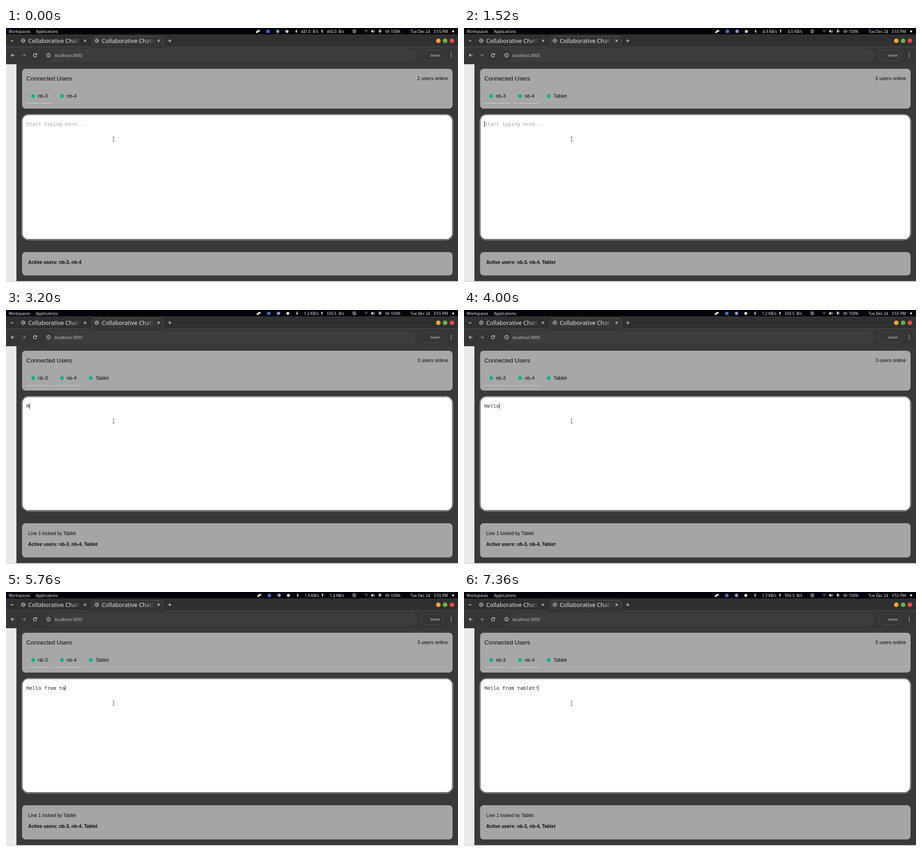
An HTML page for the animation above (8000 ms loop, 998 by 561 pixels).

```html
<!DOCTYPE html>
<html lang="en">
<head>
<meta charset="utf-8">
<title>Collaborative editor</title>
<style>
  html, body { margin: 0; width: 100%; height: 100%; overflow: hidden; background: #393939; }
  svg { display: block; width: 998px; height: 561px; }
  text { white-space: pre; }
  .bar { font: 8.45px "Noto Sans", sans-serif; fill: #f0f0f0; }
  .tab { font: 12.75px "Noto Sans", sans-serif; }
  .url { font: 9px "Noto Sans", sans-serif; fill: #c4c4c4; }
  .guest { font: 500 7.5px "Noto Sans", sans-serif; fill: #e8e8e8; }
  .page { font: 10.92px "Liberation Sans", Arial, sans-serif; fill: #080808; }
  .page .head { font-size: 13.1px; }
  .page .note { font-size: 10.37px; }
  .mono { font: 10.92px "DejaVu Sans Mono", monospace; fill: #222; }
  .end { text-anchor: end; }
  .line { fill: none; stroke: #dcdcdc; stroke-width: 1.2; }
</style>
</head>
<body>
<svg viewBox="0 0 998 561">
  <defs>
    <linearGradient id="fade" gradientUnits="userSpaceOnUse" x1="49" x2="162" y1="0" y2="0">
      <stop offset=".84" stop-color="#e6e6e6"/>
      <stop offset="1" stop-color="#e6e6e6" stop-opacity=".1"/>
    </linearGradient>
    <clipPath id="titleClip"><rect x="49" y="16" width="113" height="25"/></clipPath>
    <g id="tabLabel">
      <g fill="none" stroke="#a9adb1">
        <circle cx="38" cy="28" r="4.3" fill="#85898d"/>
        <path d="M35 26l3 1 1-2M36 31l1-2 3 1" stroke="#303030" stroke-width=".9"/>
      </g>
      <text class="tab" x="49" y="32.6" fill="url(#fade)" clip-path="url(#titleClip)">Collaborative ChatB</text>
      <path class="line" d="M172.2 25.7l4.6 4.6m0-4.6l-4.6 4.6"/>
    </g>
    <g id="chip">
      <circle cx="60" cy="150.2" r="4.2" fill="#0cb486"/>
      <path d="M45.5 166.5H101.5" stroke="#d2d2d2"/>
    </g>
    <path id="arrow" d="M-.8 -3.5H.8V.4H2.5L0 3.5L-2.5 .4H-.8Z" fill="#eee"/>
  </defs>

  <!-- desktop bar -->
  <rect width="998" height="14" fill="#04010b"/>
  <g class="bar">
    <text x="6" y="10.7">Workspaces</text>
    <text x="66" y="10.7">Applications</text>
    <text x="849.5" y="10.7">100%</text>
    <text x="893" y="10.7">Tue Dec 24</text>
    <text x="944" y="10.7">3:55 PM</text>
    <text id="down" class="end" y="10.7"></text>
    <text id="up" class="end" x="746.8" y="10.7"></text>
  </g>
  <g id="tray">
    <path d="M555 4.5h5.5v4H555zM552 7h4v4h-4z" fill="#e6e6e6"/>
    <rect x="575" y="4" width="7" height="7" fill="#3f6fd0"/>
    <circle cx="600" cy="7.3" r="3.6" fill="#7f9dcf"/>
    <circle cx="620.5" cy="7.5" r="3.3" fill="#ddd"/>
    <use href="#arrow" x="641" y="7"/>
  </g>
  <g id="upArrow"><use href="#arrow" transform="translate(0 7) scale(1 -1)"/></g>
  <g fill="none" stroke="#d8d8d8" stroke-width=".9">
    <circle cx="769" cy="7.3" r="3.8"/>
    <path d="M766.8 6.2h4.4M769 4.6v3l-1.3 2.4M769 7.6l1.3 2.4"/>
    <path d="M791.3 6q4-3.4 8 0M792.7 7.7q2.6-2.2 5.2 0M794 9.3q1.3-1 2.6 0" stroke="#999"/>
    <path d="M806.5 6h1.5l2-2v6.5l-2-2h-1.5z" fill="#ddd"/>
    <path d="M811.5 5.5q1.4 1.8 0 3.6M813 4.3q2.2 3 0 6"/>
    <rect x="824" y="3.7" width="2.6" height="4.6" rx="1.3" fill="#ddd"/>
    <path d="M822.7 7q0 2.5 2.6 2.5t2.6-2.5M825.3 9.5v1.7M829 5.5q1.2 1.6 0 3.4"/>
    <rect x="838.5" y="5" width="6.5" height="5" rx="1"/>
    <path d="M840 7.5h3.5M846 6.5v2"/>
  </g>
  <circle cx="987.3" cy="7.4" r="2.2" fill="#f2f2f2"/>

  <!-- browser -->
  <rect y="14" width="998" height="28" fill="#303030"/>
  <rect y="42" width="998" height="38" fill="#363636"/>
  <path d="M0 41.5H184q6 0 6-6V25q0-6.5 6.5-6.5H341q6.500 0 6.500 6.500V35.500q0 6 6 6H998" fill="#363636" stroke="#555"/>
  <use href="#tabLabel"/>
  <use href="#tabLabel" x="162.4"/>
  <path class="line" d="M11 27l2.500 2.500 2.500-2.500M357.800 28.200h7.400M361.500 24.500v7.400"/>
  <circle cx="954.500" cy="28.300" r="5" fill="#f6a62b"/>
  <circle cx="969.500" cy="28.300" r="5" fill="#64b545"/>
  <circle cx="984.500" cy="28.300" r="5" fill="#ee4747"/>
  <rect x="82" y="46" width="825" height="29" rx="14.500" fill="#3d3d3d"/>
  <circle cx="94" cy="60.300" r="11.500" fill="#353535"/>
  <g class="line">
    <path d="M19 60.300h-7.500m3.600-3.600l-3.600 3.600 3.600 3.600"/>
    <path d="M35.500 60.300H43m-3.600-3.600l3.600 3.600-3.600 3.600" stroke="#858585"/>
    <path d="M67 58.200A3.600 3.600 0 1 0 67.600 61M67.700 56v2.800h-2.800"/>
    <circle cx="94" cy="60.300" r="4.100"/>
    <path d="M94 59.800v2.700M94 57.900v1"/>
    <rect x="915.500" y="48.500" width="50" height="24" rx="12" stroke="#515151" stroke-width="1"/>
  </g>
  <path d="M983 56.600h.01M983 60.300h.01M983 64h.01" stroke="#e2e2e2" stroke-width="2" stroke-linecap="round"/>
  <text class="url" x="107" y="63.500">localhost:3000</text>
  <text class="guest" x="937" y="63">Guest</text>

  <!-- page -->
  <rect y="80" width="998" height="481" fill="#393939"/>
  <rect y="80" width="23" height="481" fill="#e9e9ea"/>
  <rect y="559" width="998" height="2" fill="#dedede"/>
  <rect x="35.500" y="90" width="950.500" height="88" rx="8" fill="#a7a7a7"/>
  <rect id="panel" x="35.500" width="950.500" rx="8" fill="#a5a5a5"/>
  <rect id="ring" x="35" y="191" width="951.500" rx="14" fill="#111" stroke="#e4e4e4"/>
  <rect id="field" x="36.500" y="192.300" width="948.500" rx="12.500" fill="#fff"/>
  <path id="grip" d="M980 466l4-4M982.500 466l1.500-1.500" stroke="#777" stroke-width=".7"/>
  <g class="page">
    <text class="head" x="45" y="115.600">Connected Users</text>
    <text id="count" class="end" x="976" y="115"></text>
    <use href="#chip"/>
    <text x="70.300" y="153.500">nb-3</text>
    <g clip-path="url(#chipClip)"><use href="#chip" x="63.700"/></g>
    <text x="134" y="153.500">nb-4</text>
    <g id="third">
      <circle cx="187" cy="150.200" r="4.200" fill="#0cb486"/>
      <text x="197.700" y="153.500">Tablet</text>
    </g>
    <text id="lock" class="note" x="49" y="496.800">Line 1 locked by Tablet</text>
    <text id="active" class="note" x="49" y="521.300" font-weight="bold" style="font-weight:bold"></text>
  </g>
  <clipPath id="chipClip"><rect x="105" y="140" width="65" height="20" id="chipMask"/></clipPath>
  <text id="typed" class="mono" x="45" y="216"></text>
  <rect id="caret" y="206" width="1" height="12.500" fill="#111"/>
  <path d="M235.500 240.500h1.500l.6.600.6-.6h1.500M235.500 250.500h1.500l.6-.6.6.6h1.500M237.600 241v9" fill="none" stroke="#555" stroke-width="1"/>
</svg>
<script>
  const LOOP = 8000, JOIN = 80, LOCK = 3200, CHAR = 6.574;
  const message = "Hello from tablet!";
  const keyTimes = [3040, 3360, 3520, 3600, 3920, 4240, 4400, 4720, 4800,
                    4960, 5120, 5520, 5760, 5920, 6080, 6320, 6320, 7360];
  const caretOff = [[0, 80], [560, 1120], [1600, 2160], [2640, 3040], [6960, 7360]];
  // start, download, upload, tray shift, download right edge, up arrow x
  const rates = [
    [0, "441.0  B/s", "460.0  B/s", 0, 690, 698],
    [1200, "4.9 KB/s", "4.0 KB/s", 3, 691.3, 699],
    [3200, "1.2 KB/s", "559.5  B/s", 1.7, 690, 697.6],
    [5200, "1.9 KB/s", "1.4 KB/s", 3, 691.3, 699],
    [7200, "1.3 KB/s", "959.5  B/s", 1.7, 690, 697.6]
  ];
  const $ = id => document.getElementById(id);
  const set = (id, attrs) => {
    for (const name in attrs) $(id).setAttribute(name, attrs[name]);
  };
  const show = (id, on) => set(id, { visibility: on ? "visible" : "hidden" });
  const write = (id, text) => {
    if ($(id).textContent !== text) $(id).textContent = text;
  };

  function draw(t) {
    const [, down, up, shift, edge, arrowX] = rates.findLast(r => t >= r[0]);
    write("down", down);
    write("up", up);
    set("down", { x: edge });
    set("tray", { transform: `translate(${shift})` });
    set("upArrow", { transform: `translate(${arrowX})` });

    const joined = t >= JOIN;
    show("third", joined);
    set("chipMask", { height: joined ? 30 : 20 });
    write("count", `${joined ? 3 : 2} users online`);
    write("active", "Active users: nb-3, nb-4" + (joined ? ", Tablet" : ""));

    const locked = t >= LOCK, lift = locked ? 24 : 0;
    show("lock", locked);
    set("panel", { y: 495 - lift, height: 51.5 + lift });
    set("ring", { height: 277 - lift });
    set("field", { height: 274 - lift });
    set("grip", { transform: `translate(0 ${-lift})` });

    const count = keyTimes.filter(k => t >= k).length;
    write("typed", count ? message.slice(0, count) : "Start typing here...");
    $("typed").style.fill = count ? "#222" : "#a3a3a3";
    set("caret", { x: 45 + count * CHAR });
    show("caret", !caretOff.some(([a, b]) => t >= a && t < b));
  }

  const start = performance.now();
  function tick() {
    draw((performance.now() - start) % LOOP);
    requestAnimationFrame(tick);
  }
  tick();
</script>
</body>
</html>
```
